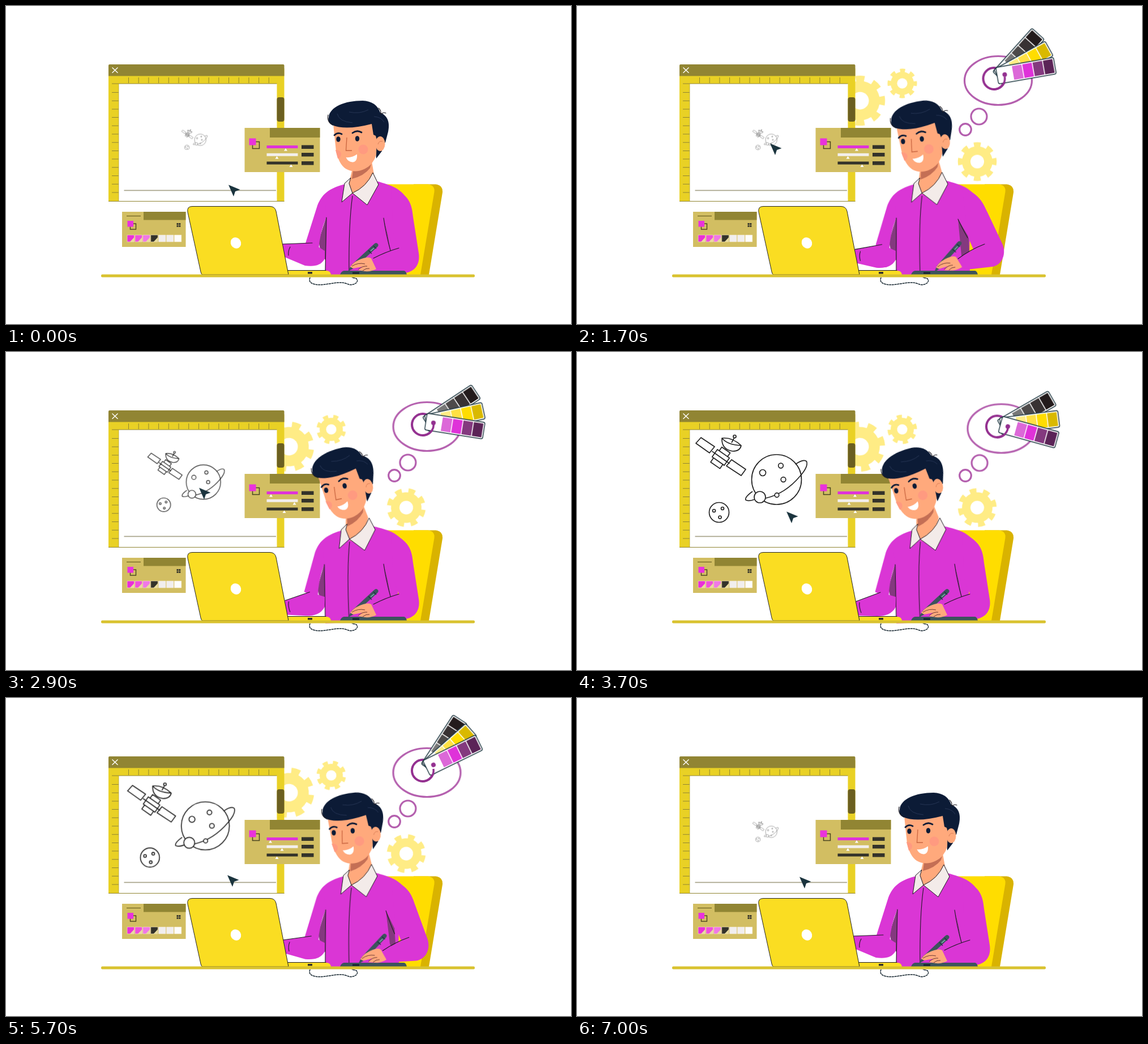
Animation, 998 px wide and 561 px high, one loop 7100 ms. Source, as an HTML page without scripts:

```html
<!DOCTYPE html>
<html lang="en">
<head>
<meta charset="utf-8">
<title>Designer at work</title>
<style>
html, body { margin: 0; width: 100%; height: 100%; overflow: hidden; background: #fff; }
svg { display: block; width: 100vw; height: 100vh; }
.line { fill: none; stroke: #1d1a22; stroke-width: 1.1; stroke-linecap: round; }
.gold { fill: #d2be62; }
.olive { fill: #918533; }
.yellow { fill: #e9d125; }
.dark { fill: #33322a; }
.pink { fill: #da36d5; }
.plum { fill: #84397f; }
.skin { fill: #ffa97c; }
.hair { fill: #0c1b36; }
.slate { fill: #3c545c; }

.loop { animation: 7.1s linear infinite; }
.sway { animation: 3.55s cubic-bezier(.37,0,.63,1) infinite alternate; }
.ease { animation-timing-function: cubic-bezier(.37,0,.63,1); }

.head { animation-name: head; transform-origin: 620px 345px; }
.body { animation-name: body; transform-origin: 610px 472px; }
@keyframes head { to { transform: rotate(-12.6deg); } }
@keyframes body { to { transform: rotate(-2.3deg); } }
.forearm { animation-name: forearm; }
@keyframes forearm {
  from { d: path("M484 420L541 418L563 432V446C556 458 545 460 528 458L490 442Z"); }
  to { d: path("M486 443L536 424L563 432V450C556 462 546 466 530 466L490 465Z"); }
}
.sleeve-line { animation-name: sleeveLine; }
@keyframes sleeveLine {
  from { d: path("M489 420L541 418M502 425Q498 432 499 440"); }
  to { d: path("M493 440L536 424M499 442Q498 450 502 460"); }
}
.eye { animation-name: blink; transform-box: fill-box; transform-origin: center; }
@keyframes blink { 0%, 63.5%, 67%, 100% { transform: none; } 64.8% { transform: scaleY(.45); } 65.6% { transform: scaleY(.15); } }

.arm { animation-name: arm; }
@keyframes arm {
  0%, 41.5%, 52.1%, 98.6%, 100% { d: path("M680 320C712 332 717 350 719 372L729 436C732 456 722 468 706 471L648 468L649 445L694 427L684 400Z"); }
  23.94%, 69% { d: path("M680 320C712 332 717 348 725 364L752 421C759 440 749 458 733 460L680 466L673 446L700 429L691 408Z"); }
}
.arm-line { animation-name: armLine; }
@keyframes armLine {
  0%, 41.5%, 52.1%, 98.6%, 100% { d: path("M667 374Q671 402 679 431M649 445Q670 434 694 427"); }
  23.94%, 69% { d: path("M673 376Q680 391 690 409M673 446Q694 430 720 420"); }
}
.shade { animation-name: shade; }
@keyframes shade {
  0%, 41.5%, 52.1%, 98.6%, 100% { d: path("M667 374L674 403L679 431L676 420Z"); }
  23.94%, 69% { d: path("M673 376L692 408L694 464L679 440Z"); }
}
.hand { animation-name: hand; transform-origin: 630px 460px; }
@keyframes hand {
  0%, 41.5%, 52.1%, 98.6%, 100% { transform: none; }
  23.94%, 69% { transform: translate(26px, -1px) rotate(-6deg); }
}

.sketch { animation-name: sketch; transform-origin: 340.3px 239.4px; }
@keyframes sketch {
  0%, 28.5%, 97.5%, 100% { transform: scale(.232); }
  50.5%, 77.5% { transform: none; }
}
.cursor { animation-name: cursor; }
@keyframes cursor {
  0% { transform: none; animation-timing-function: ease-in-out; }
  23.94% { transform: translate(-52px, -73px); }
  41.5% { transform: translate(-52px, -76px); }
  52.1% { transform: translate(-23px, -34px); }
  64.8% { transform: translate(-8px, -12px); }
  80.3% { transform: translate(-2px, -3px); }
  98.6%, 100% { transform: none; }
}
.knob { animation-name: knob; }
@keyframes knob {
  0%, 23.94%, 98.6%, 100% { transform: none; }
  40.85%, 64.8% { transform: translateX(var(--b)); }
  52.1% { transform: translateX(var(--c)); }
  80.3% { transform: translateX(var(--d)); }
}

.gear { animation-name: gear; }
@keyframes gear { 0%, 97%, 100% { transform: scale(0); } 9%, 91.5% { transform: none; } }
.spin { animation: spin 2.9s linear 1.7s infinite; }
@keyframes spin { to { transform: rotate(45deg); } }
.dot { animation-name: dot; transform-box: fill-box; transform-origin: center; }
@keyframes dot { 0%, 5%, 90%, 100% { transform: scale(0); } 10%, 85% { transform: none; } }
.cloud { animation-name: cloud; transform-box: fill-box; transform-origin: center; }
@keyframes cloud { 0%, 7%, 90%, 100% { transform: scale(0); } 14%, 84% { transform: none; } }
.drift { animation-name: drift; }
@keyframes drift {
  0%, 23.94%, 100% { transform: none; }
  40.85%, 80.3% { transform: translate(calc(var(--k) * -.5px), 0); }
  52.1% { transform: translate(calc(var(--k) * 5.5px), calc(var(--k) * 3.5px)); }
  64.8% { transform: translate(calc(var(--k) * -4px), calc(var(--k) * -2.5px)); }
}
.pop { animation-name: pop; }
@keyframes pop { 0%, 12.6%, 90%, 100% { transform: scale(0); } 19%, 87% { transform: none; } }
.fan { animation-name: fan; }
@keyframes fan {
  0%, 14% { transform: translateY(-8px) rotate(-14deg); }
  23.94% { transform: translateY(-7px) rotate(-10deg); }
  40.85% { transform: translateY(-3px) rotate(9deg); }
  52.1% { transform: rotate(15.5deg); }
  64.8% { transform: translateY(-3px) rotate(5deg); }
  80.3% { transform: translateY(-10px) rotate(-26deg); }
  90%, 100% { transform: translateY(-13px) rotate(-44deg); }
}
.open { animation-name: open; }
@keyframes open {
  0%, 23.94% { transform: rotate(-19deg); }
  40.85% { transform: rotate(-21.3deg); }
  52.1% { transform: rotate(-22.7deg); }
  64.8% { transform: rotate(-22deg); }
  80.3%, 100% { transform: rotate(-15.5deg); }
}
</style>
</head>
<body>
<svg viewBox="0 0 998 561">
<defs>
  <g id="gear">
    <circle r="27" fill="#ffec85"/>
    <circle r="29.5" fill="none" stroke="#ffec85" stroke-width="9.5" pathLength="16" stroke-dasharray="1 1" stroke-dashoffset=".5"/>
    <circle r="12" fill="#fff"/>
  </g>
  <rect id="strip" x="-13.5" y="-15" width="103.5" height="29.5" rx="3" fill="#fff" stroke="#1b343e" stroke-width="1.4"/>
  <path id="knob" d="M0 251L3 255.500H-3Z" fill="#fff"/>
  <path id="fold" d="M12.500 408V416H5Z" fill="#e9dca0"/>
</defs>

<!-- chair -->
<path fill="#d9b300" d="M720 314.500H759Q772 316 771 329L747 474H715Z"/>
<path fill="#ffdd00" d="M655 314.500H745Q758 316 756.500 328L732 474H655Z"/>

<!-- gears -->
<g transform="translate(500 167) scale(1.29)"><g class="loop gear"><use href="#gear" class="spin"/></g></g>
<g transform="translate(574.500 136.500) scale(.76)"><g class="loop gear"><use href="#gear" class="spin"/></g></g>
<g transform="translate(707 274.500)"><g class="loop gear"><use href="#gear" class="spin"/></g></g>

<!-- thought bubble with colour fan -->
<g fill="none" stroke="#b45fae" stroke-width="3.2">
  <circle class="loop dot" cx="686" cy="218" r="10.300"/>
  <g class="loop drift" style="--k:.2"><circle class="loop dot" cx="710" cy="195" r="14"/></g>
</g>
<g class="loop drift" style="--k:1">
  <ellipse class="loop cloud" cx="744" cy="131.500" rx="59.500" ry="43" fill="none" stroke="#b45fae" stroke-width="3.2"/>
  <g transform="translate(755.500 128)"><g class="loop pop">
    <circle cx="-19" r="19" fill="none" stroke="#943090" stroke-width="4"/>
    <g class="loop fan">
      <g class="loop open">
        <g class="loop open"><g transform="translate(3 -4)">
          <use href="#strip"/>
          <path fill="#777" d="M15-12.500H32V12H15Z"/><path fill="#4d4a4a" d="M33.500-12.500H50.500V12H33.500Z"/>
          <path fill="#383233" d="M52-12.500H69V12H52Z"/><path fill="#231b1c" d="M70.500-12.500H87.500V12H70.500Z"/>
        </g></g>
        <g transform="translate(1 -2)">
          <use href="#strip"/>
          <path fill="#ffec85" d="M15-12.500H32V12H15Z"/><path fill="#ffe144" d="M33.500-12.500H50.500V12H33.500Z"/>
          <path fill="#ffdd00" d="M52-12.500H69V12H52Z"/><path fill="#d9b900" d="M70.500-12.500H87.500V12H70.500Z"/>
        </g>
      </g>
      <use href="#strip"/>
      <path fill="#dc68d8" d="M15-12.500H32V12H15Z"/><path fill="#df32d9" d="M33.500-12.500H50.500V12H33.500Z"/>
      <path fill="#84397f" d="M52-12.500H69V12H52Z"/><path fill="#5b2457" d="M70.500-12.500H87.500V12H70.500Z"/>
      <circle r="4" fill="#943090"/>
    </g>
    <path d="M0-3A19 19 0 0 1-19 19" fill="none" stroke="#943090" stroke-width="3.500"/>
  </g></g>
</g>

<!-- drawing window -->
<rect class="yellow" x="181" y="110" width="310.500" height="235"/>
<path class="olive" d="M181 123.500V105Q181 103 183 103H489.500Q491.500 103 491.500 105V123.500Z"/>
<rect x="199" y="137" width="279.500" height="207" fill="#fff"/>
<path d="M181 344.500H491.500M187 137H478.500" stroke="#918533"/>
<path d="M216 131H478" stroke="#918533" stroke-width="10" stroke-dasharray="1 16.700"/>
<path d="M193 152V342" stroke="#918533" stroke-width="12" stroke-dasharray="1 13.700"/>
<path d="M199 137V344" stroke="#b7a530" stroke-width=".8"/>
<path d="M187.500 108.500L197.500 118M197.500 108.500L187.500 118" stroke="#fff" stroke-width="1.400"/>
<rect x="478.500" y="161" width="13" height="43" rx="4" fill="#6b5f20"/>
<path d="M208.500 325.300H477" stroke="#a9a58c" stroke-width="1.700"/>

<g class="loop ease sketch" fill="#fff" stroke="#222" stroke-width="1.700" stroke-linejoin="round">
  <circle cx="352.500" cy="225" r="44"/>
  <path fill="none" d="M310 246Q296 256 298 261Q303 264 314 260M333 258Q368 250 394 219Q409 202 405.500 193Q400 188 386 198"/>
  <circle cx="323" cy="256" r="10"/>
  <circle cx="328" cy="213" r="5.500"/><circle cx="360" cy="200.500" r="4.300"/>
  <circle cx="364.500" cy="225" r="4.300"/><circle cx="353" cy="252.500" r="3.800"/>
  <circle cx="251" cy="283" r="17.500"/>
  <circle cx="242" cy="280" r="2.500"/><circle cx="257" cy="276" r="2.500"/><circle cx="252.500" cy="291.500" r="2.500"/>
  <path d="M219 151L243 167L234 178L210 161ZM273 190L298 207L290 218L264 201Z"/>
  <g transform="translate(254 186) rotate(35)">
    <path d="M-19 0H19M-9-16H9V-8H-9ZM-13-8H13V8H-13ZM-13 0H13M-10 8H10V17H-10Z"/>
  </g>
  <path d="M256 152Q255 172 275 175Q288 175 290 165Q274 150 256 152ZM256 152Q266 164 290 165M273 160L278 151"/>
  <circle cx="278.500" cy="149" r="2.500"/>
</g>
<path class="loop cursor" fill="#1b343e" d="M393 315.500L413.500 324L405 327L402 336Z"/>

<!-- slider panel -->
<rect class="gold" x="421.500" y="215" width="133" height="78"/>
<rect class="olive" x="466" y="215" width="88.500" height="17"/>
<rect x="435.500" y="239.500" width="12" height="12" fill="none" stroke="#4a4420" stroke-width="1.500"/>
<rect x="429.500" y="233.500" width="12" height="12" fill="#ea32dc"/>
<rect x="460.500" y="246" width="55" height="5" fill="#df32d9"/>
<rect x="460.500" y="259.800" width="55" height="5" fill="#f3efec"/>
<path class="dark" d="M460.500 274.500H515.500V279.500H460.500ZM522 245.500H543.500V252H522ZM522 259H543.500V265.500H522ZM522 274H543.500V280.500H522Z"/>
<g class="loop knob" style="--b:-26px;--c:-3px;--d:-27px"><use href="#knob" x="494"/></g>
<g class="loop knob" style="--b:31px;--c:2px;--d:9px"><use href="#knob" x="478.500" y="14"/></g>
<g class="loop knob" style="--b:-12px;--c:-12px;--d:-25px"><use href="#knob" x="503.500" y="28.500"/></g>

<!-- swatch panel -->
<rect class="gold" x="205" y="363" width="112.500" height="62"/>
<rect class="olive" x="243" y="363" width="74.500" height="14.500"/>
<path d="M213 370.500H238" stroke="#6b5f20" stroke-width="1.200"/>
<rect x="219.500" y="384" width="10" height="10" fill="none" stroke="#4a4420" stroke-width="1.400"/>
<rect x="214.500" y="379" width="10.500" height="10.500" fill="#ea32dc"/>
<path class="dark" d="M301.500 383H304.500V386H301.500ZM305.300 383H308.300V386H305.300ZM301.500 386.800H304.500V389.800H301.500ZM305.300 386.800H308.300V389.800H305.300Z"/>
<g stroke="#f3e6c8" stroke-width=".6">
  <path fill="#ea2ed8" d="M214 404H226.500V416H214Z"/><path fill="#f04fdc" d="M228 404H240.500V416H228Z"/>
  <path fill="#f078e6" d="M241.800 404H254.300V416H241.800Z"/><path class="dark" d="M255.700 404H268.200V416H255.700Z"/>
  <path fill="#f1eeee" d="M269.600 404H282.100V416H269.600ZM283.500 404H296V416H283.500Z"/><path fill="#fdfdfd" d="M297.300 404H309.800V416H297.300Z"/>
</g>
<use href="#fold" x="214"/><use href="#fold" x="228"/><use href="#fold" x="241.800"/><use href="#fold" x="255.700"/>

<!-- person -->
<g class="sway body">
  <path class="plum" d="M567 368L552 415L556 434L564 448V474H568Z"/>
  <path class="pink" d="M596 315C570 322 558 332 550 352L528.500 420L552 432Q554 400 566 372L590 350Z"/>
  <path class="pink" d="M596 315L650 308C676 314 698 322 706 338C706 370 694 400 694 430V477H564L566 372L563 340Z"/>
  <path class="line" d="M566 373L564 466M612 335Q605 385 606 472"/>
</g>
<path class="pink sway forearm"/>
<path class="line sway sleeve-line"/>
<path class="loop ease plum shade"/>
<path class="loop ease pink arm"/>
<path class="loop ease line arm-line"/>

<g class="sway head">
  <path class="skin" d="M613 282L606 312L612 332Q640 322 650 297L645 268Z"/>
  <path fill="#c46f55" d="M613 291Q634 291 645 279L643 286Q632 300 611 305Z"/>
  <path class="hair" d="M652 240H664V256L654 269Z"/>
  <path class="skin" d="M578 208L583 256Q588 279 600 287Q616 296 634 287Q650 278 654 262L656 200Z"/>
  <path class="hair" d="M570 196C572 178 598 167 630 167Q654 168 661 188C676 194 678 208 675 222L670 241L656 240L653 229L649 227L646 208Q600 220 576 210Q567 205 570 196Z"/>
  <ellipse class="skin" cx="661" cy="243" rx="8.500" ry="13"/>
  <path d="M657 244Q659 237 665 239" fill="none" stroke="#d97f58"/>
  <path class="line" stroke="#0c1b36" d="M569 192Q566 204 577 210M658 180Q663 184 662 191M663 190Q667 187 671 189"/>
  <path d="M585 190Q588 204 612 206M606 187Q625 191 640 183M650 195Q663 196 668 205" fill="none" stroke="#2c3b5c" stroke-width=".8"/>
  <path d="M580 228Q586 222 593 226M612 224Q620 218 628 223" fill="none" stroke="#0c1b36" stroke-width="2.800" stroke-linecap="round"/>
  <ellipse class="hair loop eye" cx="587" cy="235" rx="3.700" ry="4.800"/>
  <ellipse class="hair loop eye" cx="620.500" cy="234" rx="3.700" ry="4.800"/>
  <path d="M602 232L600.500 255H611" fill="none" stroke="#c8643f" stroke-width="1.300"/>
  <circle cx="631" cy="253" r="8.500" fill="#ff9a80"/>
  <path d="M582 254Q592 254 592 262Q591 269 586 269Z" fill="#ff9a80"/>
  <path d="M600.500 267Q611 268 620 261.500Q621 275 612 275.500Q604 275 600.500 267Z" fill="#fff"/>
</g>
<g class="sway body" stroke="#1d1a22" stroke-linejoin="round" fill="#f3ebe9">
  <path d="M609 303L598 313L593 346L612 330L606 313Z"/>
  <path d="M648 294L658 315L638 351L612 330Q637 319 648 294Z"/>
</g>

<!-- laptop, tablet, cable -->
<path d="M496 467H566Q573 467 574 474H496Z" fill="#fadd22"/>
<path class="line" d="M498 466.500H565"/>
<path class="dark" d="M533 469H541V472.500H533Z"/>
<path d="M329 353.500H466Q475 353.500 477 362L499 474H347Q345 474 344 469L321 364Q319 353.500 329 353.500Z" fill="#fadd22" stroke="#222"/>
<ellipse cx="406" cy="418" rx="9" ry="10" transform="rotate(-30 406 418)" fill="#fff"/>
<path class="slate" d="M597 467H703Q707 468 708 474H590Q592 468 597 467Z"/>
<path fill="#14242e" d="M612 469.500H624V472.500H612Z"/>
<path d="M537 474V479Q534 487 542 490C556 495 575 488 590 488S604 494 614 491C623 488 622 481 616 480L611 479" fill="none" stroke="#14242e" stroke-width="1.500" stroke-dasharray="4 .7"/>

<g class="loop ease hand">
  <path class="slate" d="M604 468L610 457L650 420Q654 416 657 420Q659 423 655 426L614 463Z"/>
  <path d="M640 431L646 437M649 423L654 428" stroke="#1b343e" stroke-width="1.200"/>
  <path d="M644 432L650 427" stroke="#7fc0b4" stroke-width="1.500"/>
  <path class="skin" d="M608 460Q616 449 631 445Q640 442 645 445L654 464Q645 469 634 468L622 466L629 460L613 463Z"/>
  <path d="M611 459Q622 452 634 455M622 465Q630 458 638 459M630 467Q636 462 642 463" fill="none" stroke="#6b3a35" stroke-width="1"/>
</g>
<rect x="168" y="473.500" width="660" height="5" rx="2" fill="#d9c22f"/>
</svg>
</body>
</html>
```
